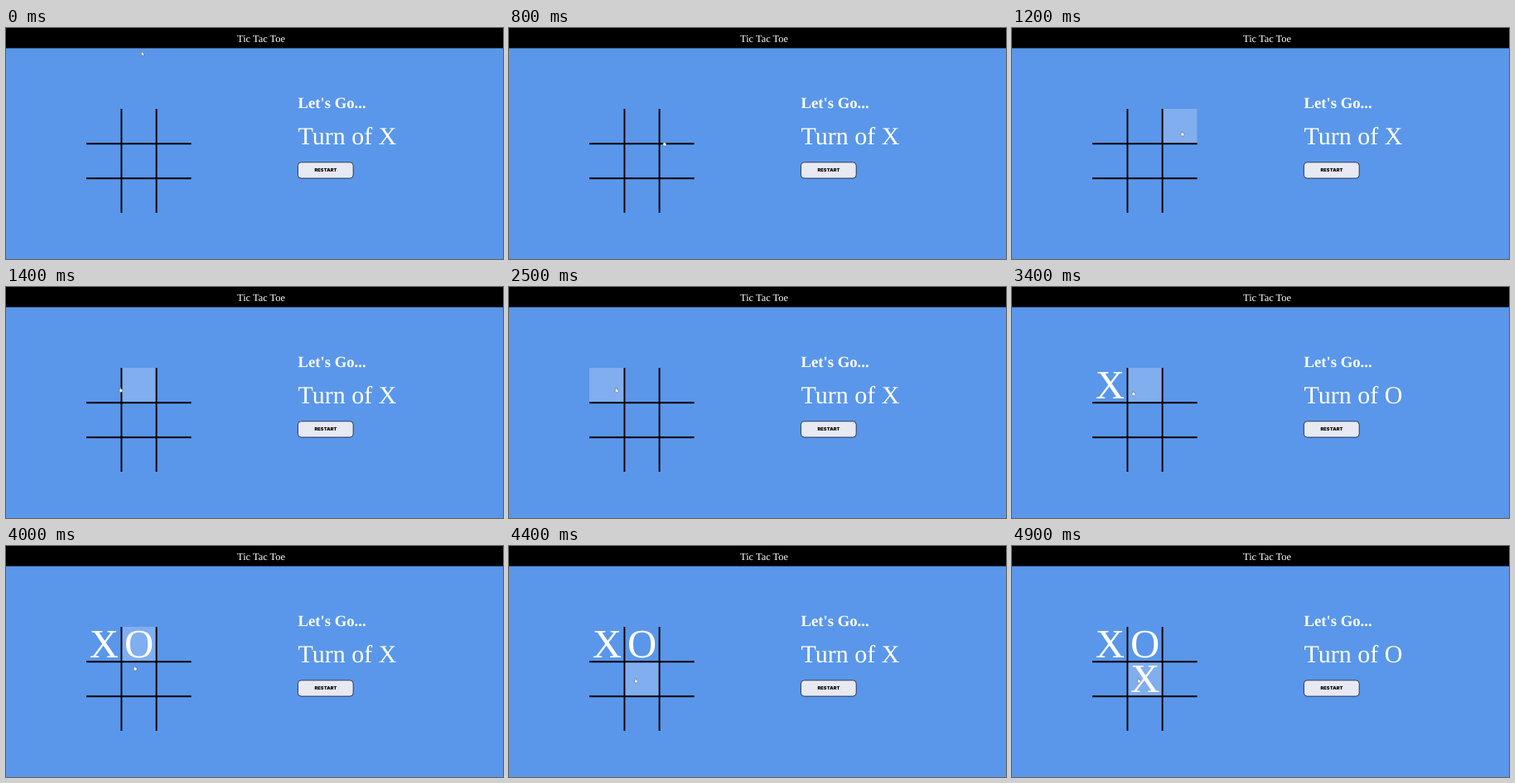
An HTML page for the animation above (5 s loop, 600 by 280 pixels).

```html
<!DOCTYPE html>
<html lang="en">
<head>
<meta charset="utf-8">
<title>Tic Tac Toe</title>
<style>
  html, body { margin: 0; width: 100%; height: 100%; overflow: hidden; background: #5a97ea; }
  svg { display: block; width: 600px; height: 280px; }
  text { font-family: "Liberation Serif", "Times New Roman", serif; fill: #fff; text-rendering: geometricPrecision; }
  .mark { font-size: 48.75px; text-anchor: middle; }
  .button { font: 900 5.6px Inter, "Liberation Sans", sans-serif; letter-spacing: .15px; text-anchor: middle; fill: #000; }
</style>
</head>
<body>
<svg viewBox="0 0 600 280">
  <rect width="600" height="280" fill="#5a97ea"/>
  <rect width="600" height="24.5"/>
  <text x="308" y="16.7" font-size="12.4" text-anchor="middle">Tic Tac Toe</text>

  <rect id="hover" width="42" height="42" fill="#81aeee"/>
  <path d="M139.4 98V224M181.6 98V224M97 140.2H223.6M97 182.2H223.6" stroke="#000" stroke-width="1.9"/>
  <g id="marks"></g>

  <text x="352.4" y="96.7" font-size="18.75" font-weight="bold">Let's Go...</text>
  <text id="turn" x="352.4" y="141.2" font-size="30"></text>
  <rect x="352.4" y="162.8" width="66.8" height="19.3" rx="4" fill="#e7e9f3" stroke="#111a2c" stroke-width=".8"/>
  <text class="button" x="386" y="174.4">RESTART</text>

  <g id="cursor" fill="#fff" stroke="#333c4c" stroke-width=".4">
    <path id="arrow" d="M0 0v6l1.4-1.2 1 2.2.9-.4-1-2.1h1.8z"/>
    <path id="hand" d="M-1.2-2.8q.5-.6.9.1v1.8l2.1.6v1.8l-.7 1.4h-2.2l-1.5-2.2.8-.3z"/>
  </g>
</svg>
<script>
const LOOP = 5000, CELL = 42.2, LEFT = 97, TOP = 98;
const $ = id => document.getElementById(id);
const show = (node, on) => node.setAttribute("visibility", on ? "visible" : "hidden");

// Where the pointer rests: start time, x, y
const stops = [
  [0, 163.4, 28], [100, 200, 88], [800, 188, 140],
  [1200, 206, 128], [1300, 168, 126], [1400, 139, 124.5],
  [2500, 130.3, 124.8], [3100, 147, 128.8], [3400, 147, 128.8],
  [3700, 159, 129], [4000, 156.2, 148], [4400, 153.6, 163]
];
const clicks = [2800, 3900, 4900];
const player = i => "XO"[i % 2];
const stopAt = time => stops.findLastIndex(stop => stop[0] <= time);

// The highlight trails the pointer by one stop.
function hoverAt(time) {
  const [, x, y] = stops[Math.max(0, stopAt(time) - 1)];
  return {
    x: LEFT + CELL * Math.floor((x - LEFT) / CELL),
    y: TOP + CELL * Math.floor((y - TOP) / CELL)
  };
}

const marks = clicks.map((time, i) => {
  const cell = hoverAt(time);
  const mark = document.createElementNS("http://www.w3.org/2000/svg", "text");
  mark.setAttribute("class", "mark");
  mark.setAttribute("x", cell.x + CELL / 2 + .2);
  mark.setAttribute("y", cell.y + 37);
  mark.textContent = player(i);
  return $("marks").appendChild(mark);
});

function draw(time) {
  const [, x, y] = stops[stopAt(time)];
  $("cursor").setAttribute("transform", `translate(${x} ${y})`);
  show($("arrow"), y < TOP);
  show($("hand"), y >= TOP);

  const cell = hoverAt(time);
  show($("hover"), cell.y >= TOP);
  $("hover").setAttribute("x", cell.x);
  $("hover").setAttribute("y", cell.y);

  const played = clicks.filter(click => click <= time).length;
  marks.forEach((mark, i) => show(mark, i < played));
  $("turn").textContent = "Turn of " + player(played);
}

function frame() {
  draw(performance.now() % LOOP);
  requestAnimationFrame(frame);
}
frame();
</script>
</body>
</html>
```
